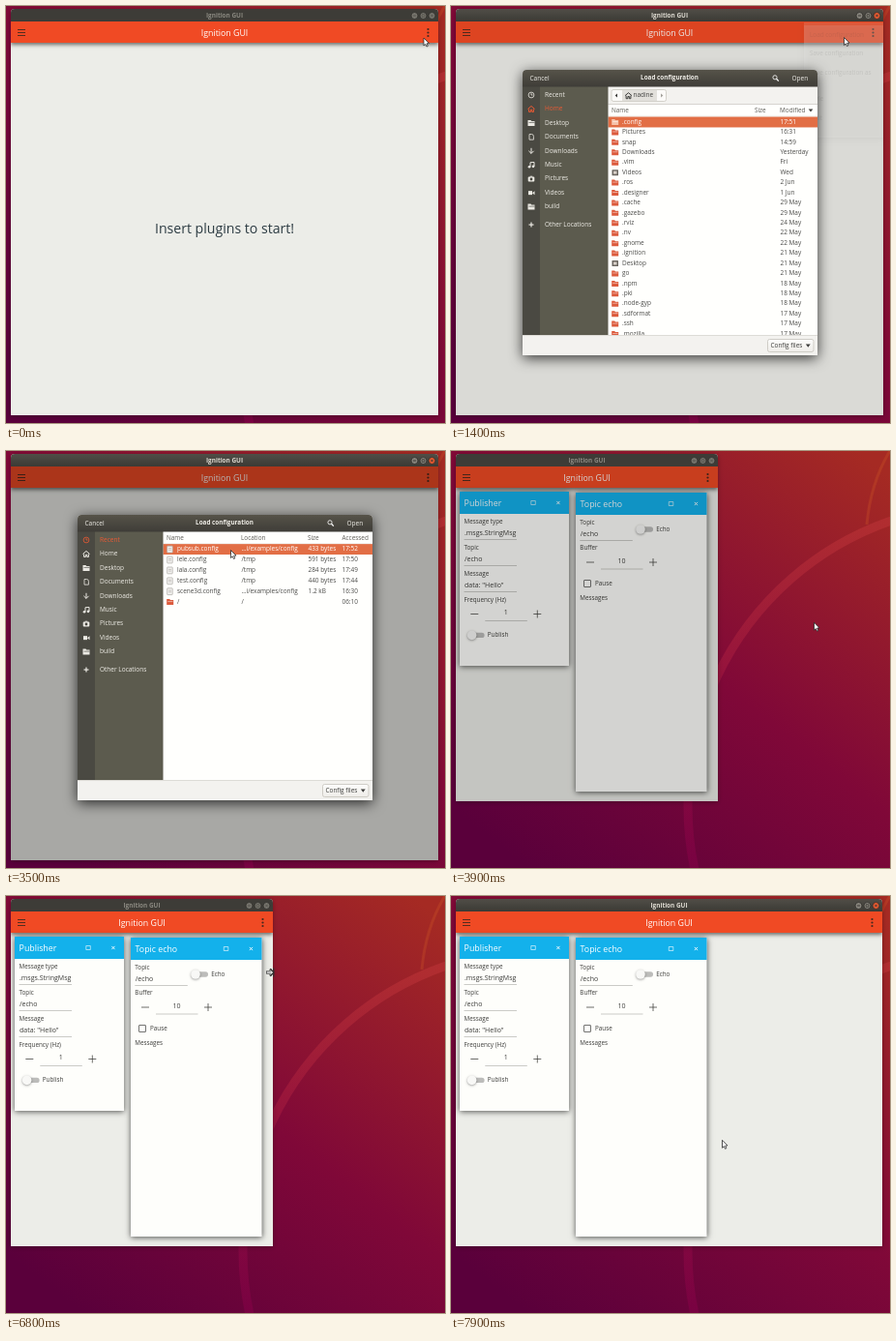
An HTML page with a canvas for the animation above (8 s loop, 454 by 431 pixels).

```html
<!DOCTYPE html>
<html lang="en">
<head>
<meta charset="utf-8">
<title>Ignition GUI</title>
<style>
html, body { margin: 0; width: 100%; height: 100%; overflow: hidden; background: #700638; }
canvas { display: block; }
</style>
</head>
<body>
<canvas id="stage" width="454" height="431"></canvas>
<script>
const c = document.getElementById('stage').getContext('2d');
const LOOP = 8000, STEP = 100;
const DARK = '#3c3c3a', RED = '#ea5a34', RULE = '#cbcbc7';

// Keyframes are [time, ...values], linear in between.
const CURSOR = [[0, 432, 33], [100, 433, 29.5], [300, 434, 23.5], [500, 434, 23.5], [800, 430, 28],
  [900, 430, 28], [1000, 406.5, 32.5], [1400, 406.5, 32.5], [1900, 300, 92], [2000, 300, 92], [2400, 108, 93],
  [2500, 108, 93], [2900, 231, 103], [3100, 231, 103], [3300, 232.5, 102.5], [3700, 232.5, 102.5], [3800, 375.5, 177.2],
  [4400, 375.5, 177.2], [4700, 90, 156], [4800, 90, 156], [4900, 47, 150], [5400, 173, 16.5], [5500, 173, 16.5],
  [5600, 178.5, 12.8], [6000, 366, 200], [6200, 281, 79], [6700, 281, 79], [6800, 273, 79],
  [7600, 350, 180], [7700, 382, 205], [7900, 280.5, 252.3]];
const DIM = [[1300, 0], [1400, .08], [1900, .29], [3700, .29], [3900, .17], [4000, .06], [4400, .06], [4500, 0]];
const MENU = [[500, 0], [800, 1], [1200, 1], [1300, .6], [1400, .12], [1500, 0]];
const EDGE = [[6800, 276], [7600, 350], [7900, 446]];

const PLACES = ['Recent', 'Home', 'Desktop', 'Documents', 'Downloads', 'Music', 'Pictures', 'Videos', 'build', 'Other Locations'];
const HOME = `.config 17:51|Pictures 16:31|snap 14:59|Downloads Yesterday|.vim Fri|Videos Wed|.ros 2 Jun|.designer 1 Jun|.cache 29 May|.gazebo 29 May|.rviz 24 May|.nv 22 May|.gnome 22 May|.ignition 21 May|Desktop 21 May|go 21 May|.npm 18 May|.pki 18 May|.node-gyp 18 May|.sdformat 17 May|.ssh 17 May|.mozilla 17 May`
  .split('|').map(s => s.split(/ (.*)/));
const RECENT = [
  ['pubsub.config', '…i/examples/config', '433 bytes', '17:52'],
  ['lele.config', '/tmp', '591 bytes', '17:50'],
  ['lala.config', '/tmp', '284 bytes', '17:49'],
  ['test.config', '/tmp', '440 bytes', '17:44'],
  ['scene3d.config', '…i/examples/config', '1.2 kB', '16:30'],
  ['/', '/', '', '06:10']];

function at(keys, t) {
  let i = keys.findIndex(k => k[0] > t);
  if (i < 0) i = keys.length;
  const a = keys[Math.max(i - 1, 0)], b = keys[Math.min(i, keys.length - 1)];
  const f = b[0] > a[0] ? (t - a[0]) / (b[0] - a[0]) : 0;
  return a.slice(1).map((v, j) => v + (b[j + 1] - v) * f);
}

function rect(x, y, w, h, fill) {
  c.fillStyle = fill;
  c.fillRect(x, y, w, h);
}

function box(x, y, w, h, radius, fill, stroke, width = .8) {
  c.beginPath();
  c.roundRect(x, y, w, h, radius);
  if (fill) { c.fillStyle = fill; c.fill(); }
  if (stroke) { c.strokeStyle = stroke; c.lineWidth = width; c.stroke(); }
}

function dot(x, y, r, fill, stroke) {
  box(x - r, y - r, 2 * r, 2 * r, r, fill, stroke);
}

function line(points, color, width = 1) {
  c.beginPath();
  points.forEach(p => c.lineTo(...p));
  c.strokeStyle = color;
  c.lineWidth = width;
  c.stroke();
}

function poly(points, fill) {
  c.beginPath();
  points.forEach(p => c.lineTo(...p));
  c.closePath();
  c.fillStyle = fill;
  c.fill();
}

function text(s, x, y, size, color, align = 'left', weight = 400) {
  c.font = `${weight} ${size}px "Open Sans", "Noto Sans", sans-serif`;
  c.textAlign = align;
  c.textBaseline = 'middle';
  c.fillStyle = color;
  c.fillText(s, x, y);
}

function shade(y0, y1, a, b) {
  const g = c.createLinearGradient(0, y0, 0, y1);
  g.addColorStop(0, a);
  g.addColorStop(1, b);
  return g;
}

function shadow(blur, alpha, draw, dy = 2) {
  c.save();
  c.shadowColor = `rgba(0,0,0,${alpha})`;
  c.shadowBlur = blur;
  c.shadowOffsetY = dy;
  draw();
  c.restore();
}

function wallpaper() {
  const g = c.createLinearGradient(80, 431, 420, 0);
  g.addColorStop(0, '#5a003b');
  g.addColorStop(.5, '#800838');
  g.addColorStop(1, '#a52a23');
  rect(0, 0, 454, 431, g);
  c.lineWidth = 9;
  c.strokeStyle = shade(80, 431, 'rgba(190,52,56,.55)', 'rgba(150,0,80,.35)');
  c.beginPath();
  c.arc(557, 367, 312, 2.8, 4.8);
  c.stroke();
  c.lineWidth = 3;
  c.strokeStyle = 'rgba(205,85,40,.32)';
  c.beginPath();
  c.moveTo(455, -2);
  c.quadraticCurveTo(434, 32, 430, 76);
  c.stroke();
}

function frame(right, bottom, focused) {
  const mid = (5 + right) / 2;
  shadow(5, .3, () => box(5, 3, right - 5, bottom - 3, [4, 4, 0, 0], '#ecede8'), 1);
  box(5, 3, right - 5, 13, [4, 4, 0, 0], focused ? shade(3, 16, '#504e47', '#3b3a35') : '#3d3c37');
  text('Ignition GUI', mid, 10, 6.4, focused ? '#dfdbd2' : '#8b8981', 'center', 700);
  [24.5, 15.5, 6.5].forEach((d, i) => {
    const x = right - d, ink = focused ? '#3a3934' : '#55534d';
    dot(x, 10, 3.5, focused ? (i == 2 ? '#e9592f' : '#85827a') : '#75736b', '#302f2b');
    if (i == 0) line([[x - 1.5, 10], [x + 1.5, 10]], ink);
    if (i == 1) box(x - 1.3, 8.7, 2.6, 2.6, 0, null, ink);
    if (i == 2) cross(x, 10, 1.3, ink);
  });
  c.save();
  c.beginPath();
  c.rect(5, 16, right - 5, 40);
  c.clip();
  shadow(4, .55, () => rect(5, 16, right - 5, 22, '#f04a24'));
  c.restore();
  text('Ignition GUI', mid, 28.7, 8.8, '#fff', 'center');
  [24.5, 27.5, 30.5].forEach(y => line([[12, y], [20, y]], '#43291f', .9));
  [24, 27.5, 31].forEach(y => dot(right - 10.5, y, 1.1, '#43291f'));
}

function cross(x, y, r, color) {
  line([[x - r, y - r], [x + r, y + r]], color, .9);
  line([[x + r, y - r], [x - r, y + r]], color, .9);
}

function panel(x, y, w, h, title) {
  shadow(6, .65, () => rect(x, y, w, h, '#fefefb'), 1);
  rect(x, y, w, 23, '#13b1eb');
  text(title, x + 4.6, y + 12.2, 8.8, '#fff');
  box(x + w - 39.2, y + 9.5, 4.5, 4, 0, null, '#fff', .6);
  cross(x + w - 11.1, y + 11.5, 1.6, '#fff');
}

function field(label, value, x, y) {
  text(label, x, y, 6.3, DARK);
  text(value, x + .5, y + 11.7, 7, DARK);
  line([[x, y + 18.5], [x + 54.5, y + 18.5]], RULE);
}

function spinner(value, x, y) {
  line([[x - 36.5, y], [x - 28.5, y]], DARK, .75);
  text(value, x, y - 1.2, 7, DARK, 'center');
  line([[x - 21.5, y + 7], [x + 22, y + 7]], RULE);
  line([[x + 28.5, y], [x + 36.5, y]], DARK, .75);
  line([[x + 32.5, y - 4], [x + 32.5, y + 4]], DARK, .75);
}

function toggle(label, x, y) {
  box(x - 2, y - 2.7, 15, 5.4, 2.7, '#bcbcba');
  shadow(2.5, .4, () => dot(x, y, 4.8, '#f8f8f6'), .8);
  text(label, x + 16.2, y, 6.3, DARK);
}

function plugins() {
  panel(9, 42, 113, 180, 'Publisher');
  field('Message type', '.msgs.StringMsg', 13.5, 73);
  field('Topic', '/echo', 13.5, 100);
  field('Message', 'data: "Hello"', 13.5, 127);
  text('Frequency (Hz)', 13.5, 154.5, 6.3, DARK);
  spinner('1', 56.8, 168.5);
  toggle('Publish', 21.6, 190.4);

  panel(129, 43, 135.5, 309, 'Topic echo');
  field('Topic', '/echo', 133.3, 74);
  toggle('Echo', 196, 81);
  text('Buffer', 133.3, 100.5, 6.3, DARK);
  spinner('10', 176.5, 115);
  box(137.5, 133.5, 7, 7, .5, null, DARK, .7);
  text('Pause', 149, 137, 6.3, DARK);
  text('Messages', 133.3, 152, 6.3, DARK);
}

function menu(alpha) {
  c.save();
  c.globalAlpha = alpha;
  shadow(5, .4, () => rect(365, 17, 82, 119, '#fbfbf8'));
  rect(365, 20, 82, 19, '#e3e3e0');
  line([[365, 81.5], [447, 81.5]], '#d5d5d2');
  ['Load configuration', 'Save configuration', 'Save configuration as', 'Style', 'Quit']
    .forEach((s, i) => text(s, 371, 30 + 19.5 * i + (i > 2 ? 8 : 0), 6.4, DARK));
  c.restore();
}

function folder(x, y, color) {
  poly([[x, y - 3], [x + 3, y - 3], [x + 3.8, y - 2], [x + 7, y - 2], [x + 7, y + 3], [x, y + 3]], color);
  line([[x + 1, y - .5], [x + 6.3, y - .5]], 'rgba(255,255,255,.6)', .8);
}

function sheet(x, y, fill, ink) {
  box(x + .5, y - 3.4, 5.5, 6.8, .5, fill, ink);
  [-1, .7].forEach(d => line([[x + 1.8, y + d], [x + 4.8, y + d]], ink, .7));
}

function house(x, y, color) {
  line([[x - 3.5, y], [x, y - 3], [x + 3.5, y]], color);
  line([[x - 2.4, y], [x - 2.4, y + 3], [x - .6, y + 3], [x - .6, y + .8], [x + .8, y + .8], [x + .8, y + 3], [x + 2.4, y + 3], [x + 2.4, y]], color);
}

function placeIcon(i, y, color) {
  const x = 83;
  if (i == 0) { dot(x, y, 2.9, null, color); line([[x, y - 1.8], [x, y], [x + 1.5, y]], color, .8); }
  if (i == 1) house(x, y, color);
  if (i == 2 || i == 8) { folder(x - 3.5, y, color); line([[x - 2.5, y - .5], [x + 3.5, y - .5]], '#4a4942', .7); }
  if (i == 3) box(x - 2, y - 2.8, 4.4, 5.6, [0, 2, 0, 0], null, color);
  if (i == 4) { line([[x, y - 3], [x, y + 2.6]], color); line([[x - 2.6, y], [x, y + 2.6], [x + 2.6, y]], color); }
  if (i == 5) {
    dot(x - 2, y + 2, 1.3, color);
    dot(x + 2, y + 1.6, 1.3, color);
    line([[x - 1, y + 2], [x - 1, y - 2.5], [x + 3, y - 2.8], [x + 3, y + 1.6]], color);
  }
  if (i == 6) { box(x - 3.3, y - 2.2, 6.6, 5, 1, color); rect(x - 1.3, y - 3, 2.6, 1, color); dot(x, y + .3, 1.4, '#4a4942'); }
  if (i == 7) { rect(x - 3, y - 2, 4, 4, color); poly([[x + 1, y], [x + 3.5, y - 2], [x + 3.5, y + 2]], color); }
  if (i == 9) { line([[x - 2.5, y], [x + 2.5, y]], color, 1.2); line([[x, y - 2.5], [x, y + 2.5]], color, 1.2); }
}

function triangle(x, y, r, color, dir) {
  poly(dir ? [[x + r * dir * .7, y], [x - r * dir * .5, y - r], [x - r * dir * .5, y + r]]
    : [[x - r, y - r * .6], [x + r, y - r * .6], [x, y + r * .7]], color);
}

function row(y, h, selected, cells, icon) {
  if (selected) rect(162.5, y - h / 2, 216.5, h, '#e26e45');
  icon(y);
  cells.forEach(([s, x]) => text(s, x, y, 6.45, selected ? '#fff' : '#4a4a48'));
}

function homeList() {
  rect(162.5, 83, 216.5, 18.5, '#f3f2ef');
  box(166, 86.5, 56.5, 12, 2, '#fbfaf8', '#cbc8c1');
  rect(177, 87, 36, 11, '#e2e0db');
  triangle(171, 92.5, 2, DARK, -1);
  triangle(218, 92.5, 2, '#a5a29c', 1);
  house(183.5, 92.7, DARK);
  text('nadine', 188.5, 92.6, 6.4, DARK);
  [['Name', 166], ['Size', 314], ['Modified', 340]].forEach(([s, x]) => text(s, x, 108.3, 6.4, '#5c5b57'));
  triangle(372, 108, 2.3, DARK);
  line([[162.5, 101.5], [379, 101.5]], '#d6d4cf');
  line([[162.5, 114], [379, 114]], '#e4e2de', .8);
  HOME.forEach(([name, date], i) => row(120 + 10.43 * i, 10.9, i == 0, [[name, 177], [date, 340.5]], y => {
    if (name == 'Videos' || name == 'Desktop') {
      box(166.5, y - 3, 6.5, 6, .5, '#6b6660');
      rect(168, y - 1.5, 3.5, 3, '#d8d0c8');
    } else folder(166.2, y, i == 0 ? '#f6c3ab' : '#dc5a3c');
  }));
}

function recentList(selected) {
  [['Name', 166], ['Location', 243], ['Size', 312], ['Accessed', 347.5]].forEach(([s, x]) => text(s, x, 90, 6.4, '#5c5b57'));
  line([[162.5, 96], [379, 96]], '#e4e2de', .8);
  RECENT.forEach((r, i) => row(101.6 + 10.9 * i, 10.9, selected && i == 0,
    r.map((s, j) => [s, [177, 243.5, 312.5, 347.5][j]]),
    y => i == 5 ? folder(166.2, y, '#dc5a3c') : sheet(166.2, y, '#f4f3f1', '#b3b0ab')));
}

function dialog(recent, selected) {
  shadow(14, .75, () => box(74, 66, 305, 295, [4, 4, 0, 0], '#fffffd'), 3);
  c.save();
  c.beginPath();
  c.rect(74, 83, 305, 257);
  c.clip();
  recent ? recentList(selected) : homeList();
  rect(74, 83, 88.5, 257, '#5c5b4e');
  rect(74, 83, 18, 257, '#4a4942');
  PLACES.forEach((s, i) => {
    const y = 92 + 14.45 * i + (i == 9 ? 4 : 0), on = i == (recent ? 0 : 1);
    placeIcon(i, y, on ? RED : '#eceae4');
    text(s, 97, y, 6.5, on ? RED : '#f0eee8');
  });
  c.restore();
  box(74, 66, 305, 17.5, [4, 4, 0, 0], shade(66, 83, '#565349', '#3f3d38'));
  text('Cancel', 81.5, 74.8, 6.5, '#f0eee8');
  text('Load configuration', 226, 74.8, 6.35, '#f0eee8', 'center', 700);
  dot(335, 73.8, 2.1, null, '#fff');
  line([[336.5, 75.3], [338.8, 77.6]], '#fff', 1.3);
  text('Open', 352.5, 74.8, 6.5, '#f0eee8');
  rect(74, 340, 305, 21, '#f3f2ef');
  line([[74, 340.5], [379, 340.5]], '#dddbd6');
  box(327.5, 344.5, 47.5, 13, 2, shade(344, 358, '#fdfdfc', '#eeece8'), '#c6c3bc');
  text('Config files', 330.5, 351, 6.4, DARK);
  triangle(369.3, 351, 2.4, DARK);
}

function pointer(x, y, resizing) {
  c.save();
  c.translate(x, y);
  if (resizing) {
    line([[-4, 0], [3, 0]], '#222', 3);
    line([[0, -3.5], [3, 0], [0, 3.5]], '#222', 2.4);
    line([[3.8, -4.5], [3.8, 4.5]], '#333', 1.2);
    line([[-3.4, 0], [2.4, 0]], '#fff', 1.4);
    line([[0, -2.6], [2.4, 0], [0, 2.6]], '#fff', 1);
  } else {
    const shape = [[0, 0], [0, 8], [1.8, 6.4], [3, 9], [4.3, 8.4], [3.2, 5.8], [5.5, 5.6]];
    poly(shape, '#fff');
    line([...shape, shape[0]], '#2a2a2a', .8);
  }
  c.restore();
}

function draw(t) {
  const loaded = t >= 3800;
  const [right] = loaded ? at(EDGE, t) : [447];
  const bottom = loaded ? 362 : 423;
  const focused = t >= 600 && t < 3800 || t >= 6900;
  wallpaper();
  frame(right, bottom, focused);
  if (loaded) plugins();
  else text('Insert plugins to start!', 226, 231, 14.1, '#2c3b42', 'center');
  const [dim] = at(DIM, t), [fade] = at(MENU, t);
  rect(5, 16, right - 5, bottom - 16, `rgba(0,0,0,${dim})`);
  if (fade > 0) menu(fade);
  if (t >= 1400 && !loaded) dialog(t >= 2500, t >= 3500);
  pointer(...at(CURSOR, t), t >= 6800 && t < 7800);
}

function tick() {
  draw(Math.floor(performance.now() % LOOP / STEP) * STEP);
  requestAnimationFrame(tick);
}
tick();
</script>
</body>
</html>
```
